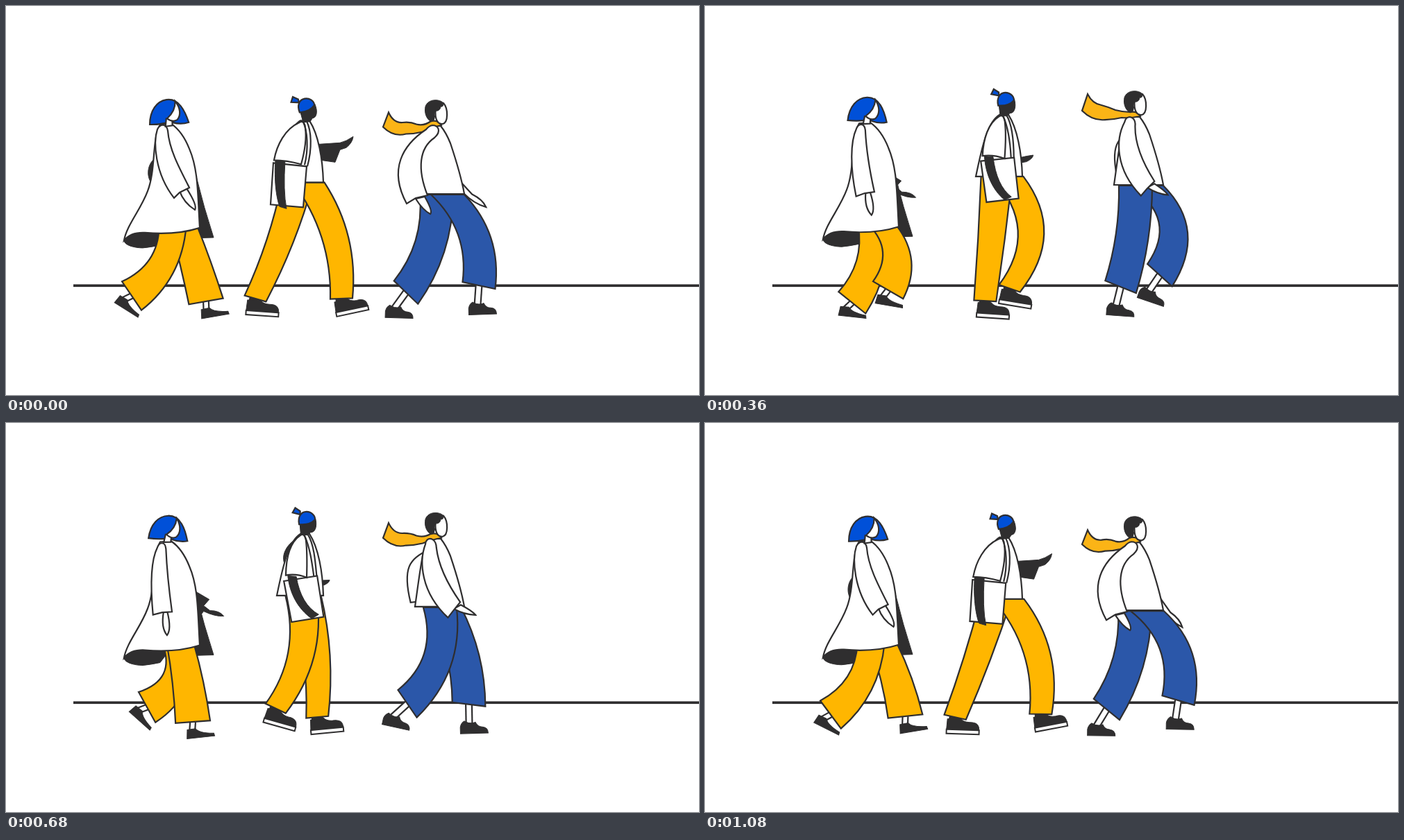
Recreate the animation shown at these times as an HTML page with a canvas. Size 998 by 561 pixels, loop 1120 ms.

```html
<!DOCTYPE html>
<html>
<head>
<meta charset="utf-8">
<title>Three walkers</title>
<style>
html, body { margin: 0; height: 100%; overflow: hidden; background: #fff }
canvas { display: block }
</style>
</head>
<body>
<canvas id="stage" width="998" height="561"></canvas>
<script>
const ctx = document.getElementById('stage').getContext('2d');
const LOOP = 1120, STEP = 40;
const INK = '#2f2e2f', WHITE = '#fff', YELLOW = '#ffb600', BLUE = '#0050d8', NAVY = '#2b57a9', SCARF = '#fbb416';
const { sin, cos, min, max, hypot, PI } = Math;

// Periodic motion: mean, then cosine and sine of the walk and of its double.
const wave = (p, [mean, a = 0, b = 0, c = 0, d = 0]) =>
  mean + a * cos(p) + b * sin(p) + c * cos(2 * p) + d * sin(2 * p);

// x, y and tilt move the trouser hem, knee bows the leg forward, toe tips the shoe.
const woman = {
  cloth: YELLOW, skin: WHITE, hip: 248, hipWidth: 39, hem: 50, farShift: 5,
  x: [234, 51, -7, -2], y: [420, 4, 12, 2], tilt: [30, -33, -11, -7],
  knee: [12, -7, -6, -4], toe: [15, -21, -12, -1, 6],
  shin: 14, lean: 8, ankle: [8, -10], width: 10,
  shoe: 'M0 0L1 -13L13 -14Q18 -7 39 -6L40 -2Z'
};
const shopper = {
  cloth: YELLOW, skin: INK, hip: 428, hipWidth: 45, hem: 32, farShift: -18,
  x: [429, 53, -4, 1, -2], y: [418, 0, 10, 4, -1], tilt: [10, -9, -13, -3, 1],
  knee: [14, 5, -15, -4], toe: [4, -8, -7, -8, 3],
  shin: 5, lean: 0, ankle: [11, -19], width: 17,
  shoe: 'M0 -6L1 -21L20 -22Q24 -17 33 -17Q47 -18 47 -6Z', sole: 'M0 -6H47V0H0Z'
};
const man = {
  cloth: NAVY, skin: WHITE, hip: 628, hipWidth: 48, hem: 48, farShift: 5,
  x: [623, 55, -2, 3, -4], y: [402, -5, 7, 6, 2], tilt: [31, -16, -19, -3, 1],
  knee: [16, 2, -12, -1, -1], toe: [7, -2, -9, -7],
  shin: 28, lean: -8, ankle: [13, -14], width: 11,
  shoe: 'M0 0L0 -9Q1 -15 6 -18Q14 -13 22 -16Q25 -9 32 -9Q40 -8 40 0Z'
};

// Blend two paths of the same build: k = 0 gives a, k = 1 gives b.
function mix(a, b, k) {
  const number = /-?[\d.]+/g, ends = b.match(number);
  let i = 0;
  return a.replace(number, n => +n + (ends[i++] - n) * k);
}

function move(x = 0, y = 0, angle = 0, px = 0, py = 0) {
  ctx.setTransform(1, 0, 0, 1, x + px, y + py);
  ctx.rotate(angle * PI / 180);
  ctx.translate(-px, -py);
}

function draw(path, fill, line = 2.2) {
  const p = new Path2D(path);
  if (fill) { ctx.fillStyle = fill; ctx.fill(p); }
  ctx.strokeStyle = INK;
  ctx.lineWidth = line;
  ctx.stroke(p);
}
const dark = path => draw(path, INK, 1);

function leg(who, p, hipY, shift) {
  const hipX = who.hip + 8 * cos(p) - 5 * sin(p);
  const x = wave(p, who.x) + shift, y = wave(p, who.y);
  const tilt = wave(p, who.tilt) * PI / 180, down = tilt + who.lean * PI / 180;
  const footX = x - who.shin * sin(down), footY = y + who.shin * cos(down);

  move();
  const shin = new Path2D(`M${footX} ${footY}L${x} ${y}`);
  for (const [color, w] of [[INK, who.width], [who.skin, who.width - 4.4]]) {
    ctx.strokeStyle = color;
    ctx.lineWidth = w;
    ctx.stroke(shin);
  }
  const [u, v] = who.ankle;
  move(footX - u, footY - v, wave(p, who.toe), u, v);
  dark(who.shoe);
  if (who.sole) draw(who.sole, WHITE, 2);

  move();
  const bow = 2 * wave(p, who.knee) / hypot(x - hipX, y - hipY);
  const bowX = bow * (y - hipY), bowY = bow * (hipX - x);
  const edge = side => {
    const top = hipX + side * who.hipWidth / 2;
    const hx = x + side * who.hem / 2 * cos(tilt), hy = y + side * who.hem / 2 * sin(tilt);
    return { top: `${top} ${hipY}`, hem: `${hx} ${hy}`, knee: `${(top + hx) / 2 + bowX} ${(hipY + hy) / 2 + bowY}` };
  };
  const back = edge(-1), front = edge(1);
  draw(`M${back.top}Q${back.knee} ${back.hem}L${front.hem}Q${front.knee} ${front.top}Z`, who.cloth);
}

function legs(who, p, hipY) {
  leg(who, p + PI, hipY, who.farShift);
  leg(who, p, hipY, 0);
}

// In each figure w is the arm swing: 1 at the start of the loop, 0 half way.
function drawWoman(phi, w) {
  const bob = wave(phi, [0, -1.3, 0, 2.2]), k = 1 - w;
  move(min(30, 100 * k), bob);
  dark('M212 221C203 230 202 247 211 256Z');
  move(-58 * w, bob);
  dark('M268 231L282 243L299 253L291 262L300 269Q314 269 320 277Q308 278 291 270L287 275L268 258Z');
  move(0, bob);
  dark('M170 337C170 344 185 348 197 348Q208 347 222 344L240 320H180Z');
  dark('M274 245Q285 290 299 333L265 334L268 300Z');
  legs(woman, phi + PI, 317 + bob);
  move(0, bob);
  draw('M222 170C210 190 216 235 204 266C194 293 174 315 170 337Q180 325 200 326Q245 330 279 319C276 270 277 235 264 205Q254 180 238 169Z', WHITE);
  draw(mix('M250 266Q256 283 272 293Q276 287 260 262Z', 'M224 272Q219 295 227 306Q234 297 229 272Z', k), WHITE);
  draw(mix('M218 177C212 195 214 240 242 276L250 268L264 261C248 230 235 205 233 179C231 168 222 169 218 177Z',
    'M218 178C208 197 207 232 208 275L222 272L236 272C234 247 231 207 230 180C229 169 221 170 218 178Z', k), WHITE);
  move(0, bob + 2 * w, -8.4 * w, 234, 152);
  draw('M205 164C208 144 220 132 234 132C252 132 258 152 261 169Q250 171 238 166L230 165Q218 166 205 164Z', BLUE);
  draw('M230 158L227 170H237L238 162', WHITE);
  draw('M246 136C252 146 252 157 245 163Q238 166 231 159C240 153 245 146 246 136Z', WHITE);
}

function drawShopper(phi, w) {
  const bob = wave(phi, [0, 1.3, 0, 4]), k = 1 - w;
  move(min(20, 60 * w), bob);
  dark('M416 165C394 175 386 198 400 211L415 200Z');
  move(0, bob);
  dark(mix('M451 194L481 192Q490 190 500 183Q499 192 490 199L481 202L474 220L453 217Z',
    'M430 232L445 233Q452 231 462 232Q461 236 452 239L443 240L440 242L430 240Z', k));
  legs(shopper, phi, 249 + bob);
  move(0, bob);
  draw('M424 160C408 170 400 200 390 249L457 249C456 215 450 180 437 160Z', WHITE);
  draw(mix('M385 221L433 226L428 285L381 281Z', 'M402 229L450 220L461 279L415 288Z', k), WHITE);
  dark(mix('M388 217C386 245 389 270 394 284L404 287Q399 262 402 217Z',
    'M408 221C411 245 424 268 446 282L456 275Q428 262 420 222Z', k));
  draw(mix('M422 163C402 172 390 195 386 217Q404 217 425 223C430 205 433 185 431 170C430 160 425 161 422 163Z',
    'M424 162C410 172 405 195 405 220Q420 217 434 223C434 205 434 185 432 169C430 160 427 160 424 162Z', k), WHITE);
  draw(mix('M430 224C436 200 434 175 428 162M434 226C441 200 440 175 433 161',
    'M445 221C441 200 438 180 430 162M449 220C446 200 444 175 435 161', k));
  move(0, bob, -12 * w, 433, 143);
  dark('M423 143L446 139C448 150 445 158 438 158L434 162L424 161Z');
  draw('M413 129L417 122L424 127L424 132Z', BLUE);
  draw('M422 146C420 134 426 128 433 128C440 128 446 134 445 140Q437 148 422 146Z', BLUE);
}

function drawScarf(phi, neck) {
  const y = (rest, swing) => neck + rest + swing * cos(phi + 1.05);
  draw(`M551 ${y(-17, 9)}Q558 ${y(-2, 10)} 571 ${y(-2, 8)}Q582 ${y(-2, 5)} 591 ${y(2, 5)}` +
    `Q602 ${y(5, 5)} 612 ${neck}Q623 ${neck - 2} 627 ${neck + 6}Q612 ${neck + 9} 600 ${y(13, 5)}` +
    `Q588 ${y(16, 5)} 576 ${y(16, 5)}Q558 ${y(20, 7)} 543 ${y(5, 7)}Z`, SCARF);
}

function drawMan(phi, w) {
  const bob = 8 * cos(2 * phi), k = 1 - w ** 1.3;
  const reach = (1 - cos(phi - .4)) / .4;
  move(min(30, 70 * w), bob);
  draw('M602 181C573 193 563 208 575 257L592 255Z', WHITE);
  move(-12 * max(0, reach - 1.5), bob);
  draw(mix('M658 250L672 262Q688 268 694 278Q675 275 660 262Z',
    'M655 243L668 270Q680 284 680 298Q668 284 656 263Z', min(1.5, reach)), WHITE);
  legs(man, phi, 264 + bob);
  move(0, bob);
  draw('M612 165C600 172 598 200 589 263L660 263C655 235 645 205 640 190Q634 175 626 165Z', WHITE);
  draw('M616 150L614 163L626 165V158Z', WHITE);
  drawScarf(phi, 158);
  draw(mix('M590 270Q600 286 611 292Q615 288 603 267Z', 'M648 266Q664 274 680 274Q675 268 658 260Z', k), WHITE);
  draw(mix('M605 170C572 192 550 227 577 277L590 269L607 265C592 227 595 197 617 182C628 172 622 164 614 164Q609 165 605 170Z',
    'M604 173C596 198 600 243 640 279L648 268L657 256C640 233 625 208 620 178C619 165 610 163 606 167Q604 169 604 173Z', k), WHITE);
  draw('M630 132C637 140 637 160 629 162C620 163 616 152 620 134Z', WHITE);
  dark('M630 132C625 126 608 125 604 137C602 147 606 155 612 159Q618 158 617 150Q617 142 622 143Q626 141 626 137Q630 138 630 132Z');
}

function frame(now) {
  const t = Math.floor(now / STEP) * STEP % LOOP;
  const phi = t / LOOP * 2 * PI, w = (1 + cos(phi)) / 2;
  move();
  ctx.fillStyle = WHITE;
  ctx.fillRect(0, 0, 998, 561);
  ctx.fillStyle = INK;
  ctx.fillRect(97, 401.4, 901, 3.7);
  drawWoman(phi, w);
  drawShopper(phi, w);
  drawMan(phi, w);
  requestAnimationFrame(frame);
}
requestAnimationFrame(frame);
</script>
</body>
</html>
```
